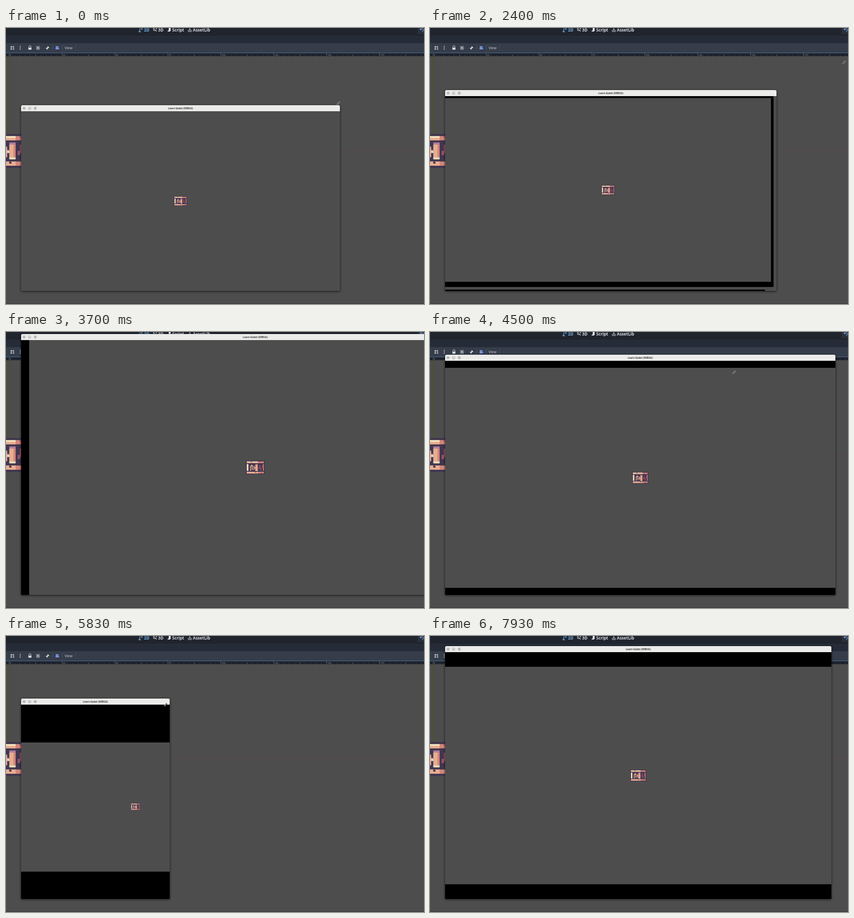
These frames come from a looping animation (830x547 px, 8 s). An HTML page with a canvas:

```html
<!DOCTYPE html>
<html lang="en">
<head>
<meta charset="utf-8">
<title>Window resize</title>
<style>
html, body { margin: 0; width: 100%; height: 100%; overflow: hidden; background: #4d4d4d; }
canvas { display: block; }
</style>
</head>
<body>
<canvas id="stage" width="830" height="547"></canvas>
<script>
const ctx = document.getElementById('stage').getContext('2d');
const LOOP = 8000, LEFT = 30, BOTTOM = 521, BAR = 12, GRAY = '#4d4d4d';
const SANS = '"Noto Sans", "Open Sans", sans-serif';

// [time, right edge, top edge] of the game window
const windowKeys = [
  [0, 663, 153], [2270, 663, 153], [2340, 677, 137], [2370, 682, 131], [2400, 688, 123],
  [2600, 755, 82], [2800, 820, 42], [2970, 870, 35], [3000, 880, 30], [3030, 888, 30],
  [3400, 960, 4], [4030, 960, 4], [4300, 890, 25], [4440, 805, 45], [4500, 805, 45],
  [4850, 640, 80], [5400, 560, 95], [5770, 487, 104], [5830, 325, 124], [6100, 325, 124],
  [6580, 380, 90], [6640, 571, 55], [6670, 575, 49], [6700, 593, 46],
  [7050, 740, 28], [7330, 797, 20], [8000, 797, 20]
];

// [time, x, y] of the pointer
const pointerKeys = [
  [0, 660, 149], [70, 660, 149], [200, 663, 156], [370, 663, 156], [600, 724, 110],
  [800, 500, 20], [870, 281, 7], [1000, 450, 60], [1170, 668, 156], [1430, 664, 158],
  [1570, 664, 158], [1630, 663, 159], [2000, 663, 159], [2150, 700, 130], [2400, 822, 68],
  [2500, 870, 40], [4200, 870, 20], [4350, 760, 50], [4500, 604, 80], [4850, 520, 88],
  [5400, 330, 130], [5830, 317, 136], [6050, 317, 136], [6350, 640, 50], [6450, 800, 6],
  [6700, 736, 16], [7000, 790, 18], [7330, 798, 21], [8000, 800, 22]
];

// Crate parts on a 22 by 16 grid: colour, x, y, width, height
const DARK = '#40364f', CREAM = '#f0dfbd', PEACH = '#e7ad90', SALMON = '#d4857a', RED = '#a5536a';
const crate = [
  [DARK, 0, 0, 22, 16],
  [SALMON, 1, 1, 20, 2], [CREAM, 1, 1, 13, 1], [PEACH, 1, 2, 13, 1], [RED, 16, 1, 1, 1], [DARK, 6, 1, 1, 1],
  [SALMON, 1, 13, 20, 2], [PEACH, 1, 13, 13, 2], [DARK, 11, 13, 1, 1], [RED, 17, 14, 2, 1],
  [CREAM, 1, 4, 2, 8], [SALMON, 20, 4, 1, 8],
  ['#b08098', 11, 4, 3, 1], [PEACH, 11, 5, 3, 6], [CREAM, 11, 11, 3, 1], [SALMON, 13, 5, 1, 6],
  [PEACH, 5, 6, 1, 6], [PEACH, 6, 5, 2, 2], [PEACH, 7, 7, 1, 4], [PEACH, 9, 6, 1, 5], [CREAM, 10, 8, 1, 1],
  [RED, 15, 8, 1, 2], [RED, 16, 5, 1, 4], [RED, 17, 9, 1, 3], [RED, 19, 5, 1, 3], [RED, 18, 8, 1, 1]
];

function at(keys, time) {
  const t = Math.max(0, time);
  const i = Math.max(1, keys.findIndex(k => k[0] >= t));
  const [t0, x0, y0] = keys[i - 1], [t1, x1, y1] = keys[i];
  const u = (t - t0) / (t1 - t0);
  return [x0 + (x1 - x0) * u, y0 + (y1 - y0) * u];
}

function box(color, x, y, w, h) {
  ctx.fillStyle = color;
  ctx.fillRect(x, y, w, h);
}

function text(str, x, y, font, color, align = 'left') {
  ctx.font = font + ' ' + SANS;
  ctx.fillStyle = color;
  ctx.textAlign = align;
  ctx.fillText(str, x, y);
}

function stroke(path, x, y, color, width = 1) {
  ctx.save();
  ctx.translate(x, y);
  ctx.strokeStyle = color;
  ctx.lineWidth = width;
  ctx.stroke(new Path2D(path));
  ctx.restore();
}

function drawCrate(cx, cy, s) {
  const x0 = cx - 11 * s, y0 = cy - 8 * s;
  for (const [color, x, y, w, h] of crate) box(color, x0 + x * s, y0 + y * s, w * s, h * s);
}

function drawRuler() {
  box('#1e232c', 0, 50, 830, 6);
  box('#4b6a89', 0, 49, 830, 1);
  for (let i = 0; i < 80; i++) {
    const h = i % 10 === 0 ? 6 : i % 5 === 0 ? 4 : 1.5;
    box('#69707b', 6 + i * 10.5, 56 - h, 0.8, h);
  }
  for (let i = 0; i < 8; i++) text(i * 25, 8 + i * 105, 54.5, '4.3px', '#a4a9b0');
}

function drawTools() {
  const light = '#d8dbe0', blue = '#7eaff0';
  stroke('M-3 3V-2H3M1 -4L3 -2L1 0M-4 2H-1V4H-4Z', 268, 4, '#6da8dc');
  stroke('M-3 -3V2H3M-3 -3L3 4M1 -2H3V0', 296, 3, light);
  box(light, 323, 0, 4, 6);
  box(light, 321, 5, 5, 2);
  stroke('M0 -4V2M-2 0L0 2L2 0M-3 1V4H3V1', 365, 3, light);
  text('2D', 274, 6.5, 'bold 8.2px', '#74b2ec');
  text('3D', 302, 6.5, 'bold 8.2px', light);
  text('Script', 330, 6.5, 'bold 8.2px', light);
  text('AssetLib', 371, 6.5, 'bold 8.2px', light);
  box('#2a303b', 817, 0, 13, 12);
  stroke('M-3 0A3 3 0 1 1 0 4M-4 -2L-3 1L0 0', 826, 3, blue);

  stroke('M-4 -2H4M-4 2H0M-2 -4V4M2 -4V0M1 2H4M2.5 .5V4', 12.5, 39.5, light);
  for (const y of [36, 39, 42]) box(light, 27.5, y - 0.5, 1.6, 1.6);
  box(light, 44.5, 39, 6, 4);
  stroke('M-2 0V-2A2 2 0 0 1 2 -2V0', 47.5, 39, light);
  ctx.setLineDash([2, 1]);
  stroke('M-3 -3H3V3H-3Z', 63.5, 39.5, light);
  ctx.setLineDash([]);
  box(light, 62, 38, 3, 3);
  stroke('M-2 2L2 -2', 82.5, 39.5, light, 2.4);
  stroke('M-3 0L0 3M0 -3L3 0', 82.5, 39.5, light, 1.3);
  box('#7c94e8', 98.5, 38.5, 5, 4);
  box('#7c94e8', 99, 36, 5, 2.5);
  box('#7c94e8', 103.5, 39, 2, 3);
  for (const x of [92, 111, 137]) box('#474e5b', x, 33, 1, 13);
  text('View', 116.5, 42.2, '7.1px', '#c9cdd3');
}

function drawEditor() {
  box(GRAY, 0, 0, 830, 547);
  box('#20242d', 0, 0, 830, 15);
  box('#252c38', 0, 15, 830, 15);
  box('#363d4a', 0, 30, 830, 19);
  drawTools();
  drawRuler();
  box('#4a5410', 6, 56, 1, 154);
  box('#3d573a', 6, 277, 1, 270);
  box('#5a474a', 30, 243, 800, 1);
  drawCrate(6.5, 243.6, 4.2);
  stroke('M-3 0H3M0 -3V3', 4, 243.5, '#f3d3bd', 1);
  box('#363636', 0, 546, 830, 1);
}

// The rendered surface trails the window frame while it is being resized.
function drawGame(t, right, top) {
  const y = top + BAR;
  box(GRAY, LEFT, y, right - LEFT, BOTTOM - y);
  box('#000', LEFT, 518.5, at(windowKeys, t - 120)[0] - LEFT, 2.5);

  const [surfaceRight, surfaceTop] = at(windowKeys, t - 30);
  box('#000', LEFT, y, surfaceRight - LEFT, BOTTOM - BAR - surfaceTop);

  const [viewRight, viewTop] = at(windowKeys, t - 60);
  const vw = viewRight - LEFT, vh = BOTTOM - BAR - viewTop;
  const w = Math.min(vw, vh * 16 / 9), h = w * 9 / 16;
  const cx = LEFT + vw / 2, cy = y + vh / 2;
  box(GRAY, Math.round(cx - w / 2), Math.round(cy - h / 2), Math.round(w), Math.round(h));
  drawCrate(cx, cy, w / 528);
}

function drawWindow(t) {
  const [right, top] = at(windowKeys, t).map(Math.round);
  const w = right - LEFT;
  ctx.save();
  ctx.beginPath();
  ctx.roundRect(LEFT, top, w, BOTTOM - top, [3, 3, 0, 0]);
  ctx.shadowColor = 'rgba(0,0,0,.75)';
  ctx.shadowBlur = 4;
  ctx.shadowOffsetY = 1;
  ctx.fillStyle = '#333';
  ctx.fill();
  ctx.shadowColor = 'transparent';
  ctx.clip();
  drawGame(t, right, top);

  box('#ebebea', LEFT, top, w, BAR);
  const marks = ['M-1 -1L1 1M1 -1L-1 1', 'M-1.2 1H1.2', 'M-1 -1H1V1H-1Z'];
  marks.forEach((mark, i) => {
    const x = 35.8 + i * 11.1, y = top + 6;
    ctx.beginPath();
    ctx.arc(x, y, 3.7, 0, 7);
    ctx.fillStyle = '#d4d4d3';
    ctx.fill();
    stroke(mark, x, y, i ? '#858585' : '#555', 0.8);
  });
  text('Learn Godot (DEBUG)', LEFT + w / 2, top + 7.7, 'bold 4.7px', '#333', 'center');
  ctx.restore();
}

function drawPointer(t) {
  if (t >= 7900) return;
  const [x, y] = at(pointerKeys, t);
  const arrow = 'M-2 2L2 -2M0 -2H2V0M-2 0V2H0';
  stroke(arrow, x, y, '#d0d0d0', 2);
  stroke(arrow, x, y, '#1c1c1c', 0.9);
}

function frame(now) {
  const t = now % LOOP;
  drawEditor();
  drawWindow(t);
  drawPointer(t);
  requestAnimationFrame(frame);
}
requestAnimationFrame(frame);
</script>
</body>
</html>
```
